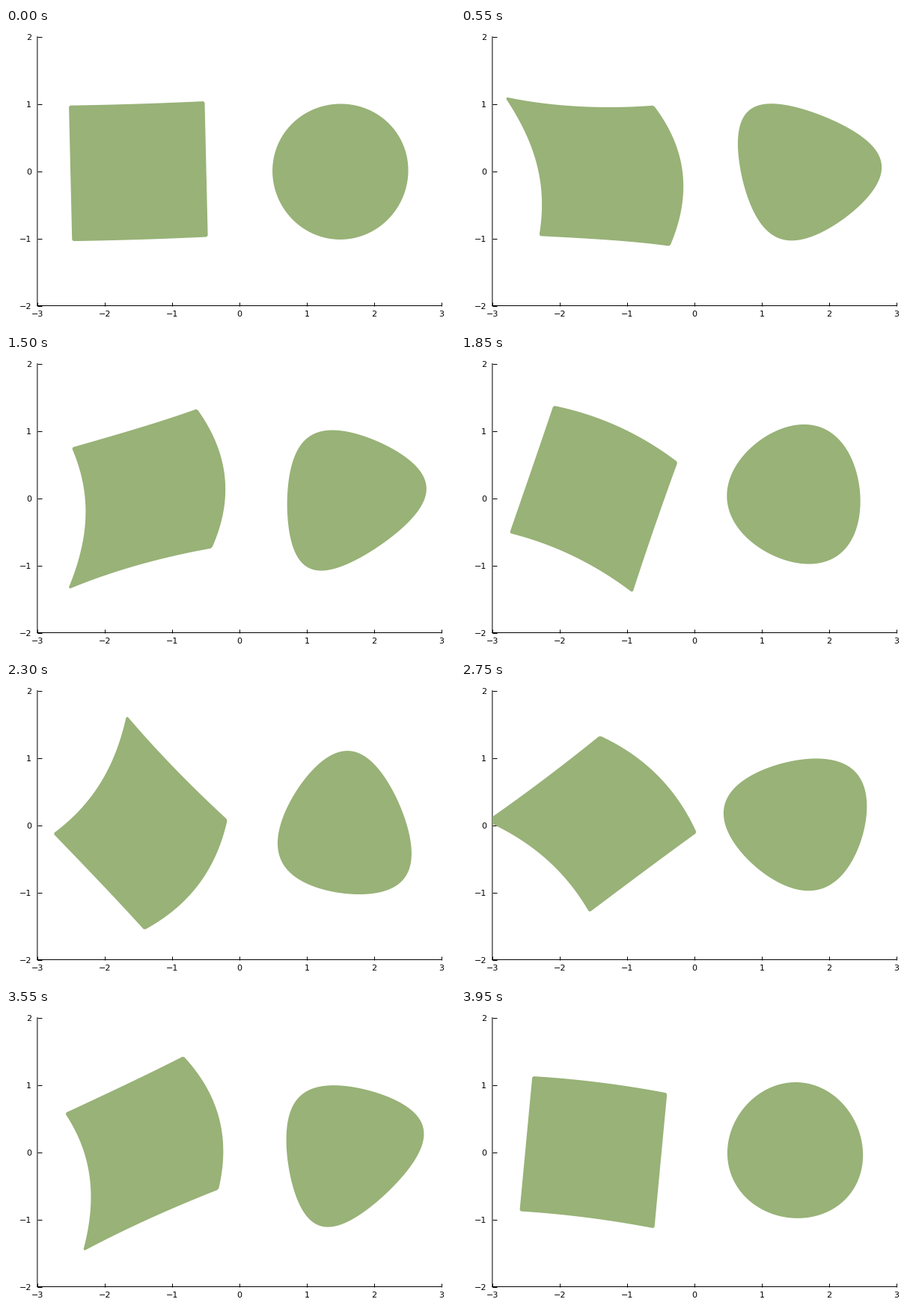
A matplotlib script for the animation above (4000 ms loop, 600 px wide and 400 px high).

```python
import numpy as np
import matplotlib.pyplot as plt
from matplotlib.animation import FuncAnimation
from matplotlib.patches import Polygon

W, H, DPI = 600, 400, 100
FRAMES, INTERVAL = 80, 50
GREEN = "#98b277"
LEFT, RIGHT, TOP, BOTTOM = 41.9, 581.8, 11.6, 371.5

plt.rcParams["font.family"] = "DejaVu Sans"


def px(n):
    return n * 72 / DPI


def square(n=60, inset=0.015):
    """Outline of a 2 x 2 square with slightly cut corners."""
    u = np.linspace(-1 + inset, 1 - inset, n)
    one = np.ones(n)
    x = np.concatenate([u, one, -u, -one])
    y = np.concatenate([-one, u, one, -u])
    return np.array([x, y])


def circle(n=240):
    t = np.linspace(0, 2 * np.pi, n, endpoint=False)
    return np.array([np.cos(t), np.sin(t)])


def square_field(z, s, w):
    """Cubic potential, plus a weak second-order correction."""
    x, y = z
    k = 0.255 * s
    a, b, c, d, e = w * np.array([-0.038, 0.015, 0.015, 0.022, 0.03])
    dx = k * y + (a + d) * x + 3 * b * x * y**2 + c * x**3 - e * (1 - y**2)
    dy = k * (x**2 - 1) - (a - d) * y - b * y**3 - 3 * c * x**2 * y
    return np.array([dx, dy])


def circle_field(z, s, w):
    """Three-lobed harmonic potential with a slight shear."""
    x, y = z
    k = 0.12 * s
    return k * np.array([2 * x * y + y, x**2 - y**2 - 1])


def flow(field, z, s, w, steps=4):
    h = 1 / steps
    for _ in range(steps):
        k1 = field(z, s, w)
        k2 = field(z + h / 2 * k1, s, w)
        k3 = field(z + h / 2 * k2, s, w)
        k4 = field(z + h * k3, s, w)
        z = z + h / 6 * (k1 + 2 * k2 + 2 * k3 + k4)
    return z


def pose(field, z, i):
    """Deform the outline along its field, then rotate it."""
    theta = 2 * np.pi * (i + 0.2) / 40
    sn, cs = np.sin(theta), np.cos(theta)
    x, y = flow(field, z, sn, 1.2 * sn**2 * np.exp(-i / 70))
    return np.array([cs * x - sn * y, sn * x + cs * y])


fig = plt.figure(figsize=(W / DPI, H / DPI), dpi=DPI, facecolor="white")
ax = fig.add_axes([LEFT / W, 1 - BOTTOM / H,
                   (RIGHT - LEFT) / W, (BOTTOM - TOP) / H])
ax.set(xlim=(-3, 3), ylim=(-2, 2), xticks=range(-3, 4), yticks=range(-2, 3))
ax.spines[["top", "right"]].set_visible(False)
ax.tick_params(direction="in", length=px(5.5), width=px(1), labelsize=8)
ax.tick_params(axis="x", pad=px(6.6))
ax.tick_params(axis="y", pad=px(8))
for side in ("left", "bottom"):
    ax.spines[side].set(linewidth=px(1), snap=False)
for line in ax.get_xticklines() + ax.get_yticklines():
    line.set_snap(False)

shapes = []
for outline, field, cx in ((square(), square_field, -1.5),
                           (circle(), circle_field, 1.5)):
    patch = Polygon(outline.T, closed=True, facecolor=GREEN, edgecolor=GREEN,
                    linewidth=px(1.5), joinstyle="round", zorder=3)
    ax.add_patch(patch)
    shapes.append((patch, field, outline, np.array([cx, 0])))


def update(i):
    for patch, field, outline, centre in shapes:
        patch.set_xy(pose(field, outline, i).T + centre)
    return [s[0] for s in shapes]


anim = FuncAnimation(fig, update, frames=FRAMES, interval=INTERVAL,
                     repeat=True, repeat_delay=0, blit=False)
plt.show()
```
